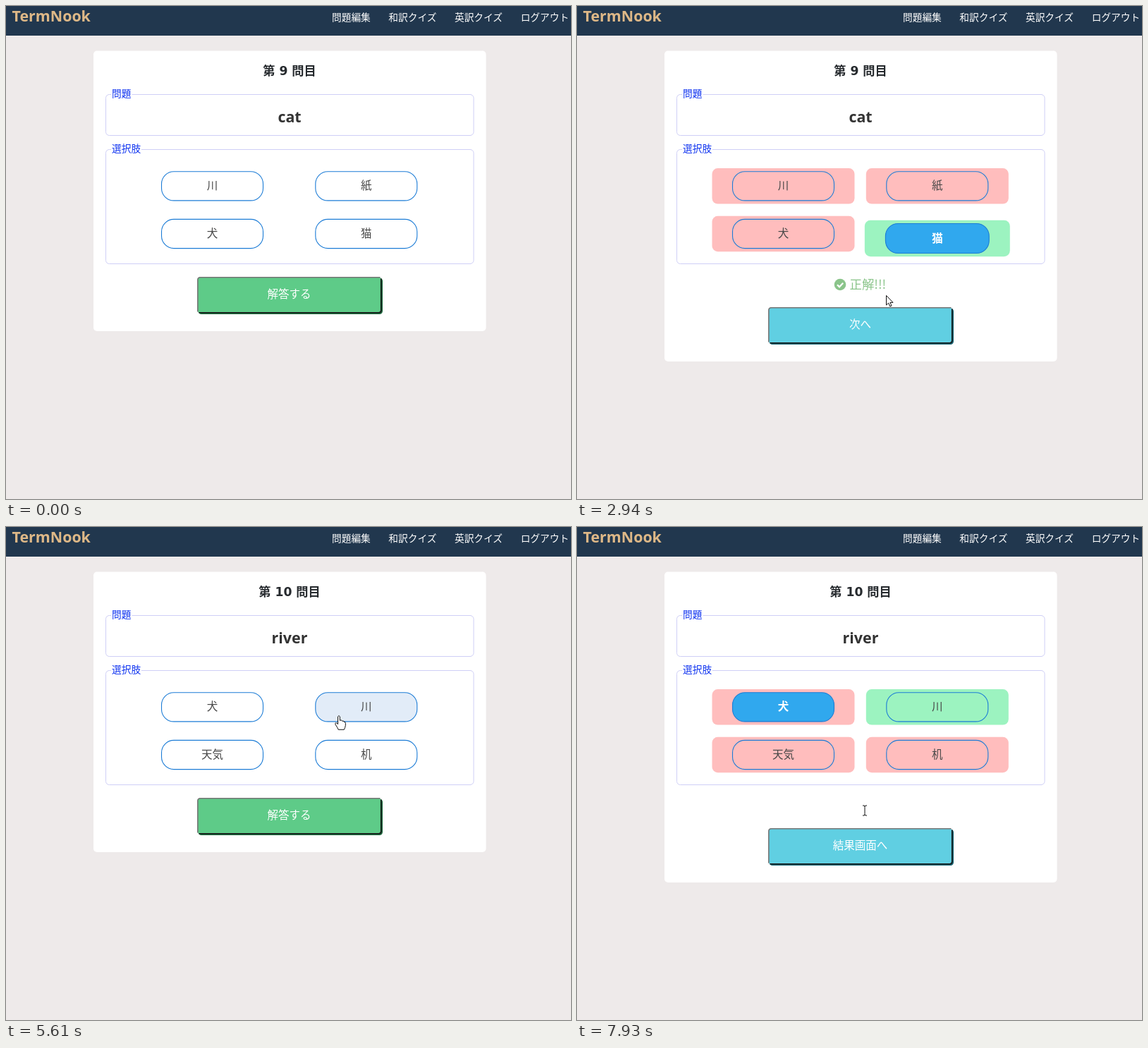
Recreate the animation shown at these times as an HTML page. Size 801 px wide and 699 px high, loop 8000 ms.

```html
<!DOCTYPE html>
<html lang="ja">
<head>
<meta charset="utf-8">
<title>Quiz</title>
<style>
  html, body { margin: 0; width: 100%; height: 100%; overflow: hidden; background: #eeeaea; }
  svg { display: block; }
  text { font-family: 'Noto Sans CJK JP', 'Noto Sans CJK', sans-serif; }
  .mid { text-anchor: middle; }
  .brand, .word { font: bold 21.4px 'Noto Sans', sans-serif; }
  .brand { fill: #deb887; }
  .word { fill: #333; }
  .nav { font-size: 13.7px; fill: #fff; }
  .title { font: bold 17.2px 'DejaVu Sans', 'Noto Sans CJK JP', 'Noto Sans CJK', sans-serif; fill: #262a2e; }
  .legend { font-size: 13.7px; fill: #1034f0; }
  .frame { fill: none; stroke: #cfcff6; }
  .label { font-size: 15.5px; }
  .pill { stroke: #1c7cd6; stroke-width: 1.1; }
  .edge { fill: none; stroke-width: 1.6; }
</style>
</head>
<body>
<svg width="801" height="699" viewBox="0 0 801 699">
  <rect width="801" height="42" fill="#21374e"/>
  <text class="brand" x="8.5" y="22">TermNook</text>
  <text class="nav" x="462" y="20.5">問題編集<tspan dx="25.6">和訳クイズ</tspan><tspan dx="25.6">英訳クイズ</tspan><tspan dx="25.6">ログアウト</tspan></text>
  <rect id="card" x="124" y="63.5" width="556.5" height="397.5" rx="5" fill="#fff"/>
  <text id="title" class="title mid" x="402" y="98"></text>

  <rect class="frame" x="141.5" y="125.5" width="521.5" height="58" rx="5"/>
  <rect class="frame" x="141.5" y="203.5" width="521.5" height="162" rx="5"/>
  <rect x="149" y="120" width="29.5" height="10" fill="#fff"/>
  <rect x="149" y="198" width="43" height="10" fill="#fff"/>
  <text class="legend" x="150" y="129">問題</text>
  <text class="legend" x="150" y="207">選択肢</text>

  <g id="quiz">
    <text id="word" class="word mid" x="402" y="165"></text>
    <g id="choices"></g>
  </g>

  <g id="button">
    <rect id="shade" x="-129" y="-24" width="261.5" height="51.5" rx="4.5"/>
    <rect id="face" x="-130" y="-25" width="260" height="50.5" rx="4"/>
    <path class="edge" d="M130.2-23V22Q130.2 25.2 127 25.2H-128" stroke="#141414"/>
    <path class="edge" d="M-129.7 24V-21Q-129.7-24.7-126-24.7H129" stroke="#767676"/>
    <text id="action" class="label mid" y="4.8" fill="#fff"></text>
  </g>

  <g id="message" fill="#008000">
    <circle cx="373" cy="395" r="8.3"/>
    <path d="M369 395.3l3 3 5.2-5.6" fill="none" stroke="#fff" stroke-width="2.2"/>
    <text x="386.5" y="401" font-size="17.4">正解!!!</text>
  </g>

  <g id="cursor" fill="#fff" stroke="#111" stroke-linejoin="round">
    <path id="arrow" d="M.5.5V14L3.7 11.2 5.8 16 8 15 5.9 10.4H10Z"/>
    <path id="hand" d="M-1.4 1.5Q0-1 1.4 1.5V7Q4 5.5 4.8 8 7 6.8 7.2 9 9.4 8.4 9.4 11V14Q9 17 7.4 20H-.8Q-1.6 17.5-5 12.6-5.4 9.2-2.6 11L-1.4 12.3Z"/>
    <path id="beam" d="M-3-7H-1L0-6 1-7H3M0-6V6M-3 7H-1L0 6 1 7H3" fill="none"/>
  </g>
</svg>
<script>
const LOOP = 8000;
const HOVER = 100;
const SVG = 'http://www.w3.org/2000/svg';
const $ = id => document.getElementById(id);
const set = (el, attrs) => { for (const k in attrs) el.setAttribute(k, attrs[k]); };
const show = (el, on) => set(el, { visibility: on ? 'visible' : 'hidden' });

// start, answered, picked: times; pick, key: choice indexes
const rounds = [
  { start: 0, answered: 2670, picked: 1770, pick: 3, key: 3, title: '第 9 問目', word: 'cat',
    choices: ['川', '紙', '犬', '猫'], next: '次へ' },
  { start: 4390, answered: 7925, picked: 7220, pick: 0, key: 1, title: '第 10 問目', word: 'river',
    choices: ['犬', '川', '天気', '机'], next: '結果画面へ' }
];

const place = {
  corner: [745, 688], topLeft: [316, 263], topRight: [479.5, 267.5], lowRight: [484.5, 318.5],
  submit: [438, 410], next: [438, 447], gap: [431, 374], message: [408, 402]
};

// Pointer moves: start, end, destination
const moves = [
  [0, 130, 'corner'], [130, 890, 'topLeft'], [960, 1240, 'topRight'], [1310, 1730, 'lowRight'],
  [1800, 2540, 'submit'], [3440, 3650, 'next'], [4500, 4660, 'gap'], [4800, 5280, 'topLeft'],
  [5350, 5650, 'topRight'], [5720, 5940, 'topLeft'], [6090, 6420, 'lowRight'],
  [6770, 7200, 'topLeft'], [7450, 7800, 'message']
];

const slots = [0, 1, 2, 3].map(i => {
  const add = (tag, attrs, parent) => {
    const el = document.createElementNS(SVG, tag);
    set(el, attrs);
    return parent.appendChild(el);
  };
  const g = add('g', {}, $('choices'));
  return {
    x: 292.5 + 218.3 * (i % 2),
    y: 255.3 + 67.7 * (i >> 1),
    g,
    mark: add('rect', { x: -101, y: -25.2, width: 202, height: 50.4, rx: 8 }, g),
    pill: add('rect', { x: -72, y: -20.6, width: 144, height: 41.2, rx: 17.5, class: 'pill' }, g),
    text: add('text', { y: 5, class: 'label mid' }, g)
  };
});

const clamp = p => Math.min(1, Math.max(0, p));
const smooth = p => p * p * (3 - 2 * p);

// The standard CSS "ease" curve, solved by bisection
function ease(p) {
  if (p <= 0 || p >= 1) return clamp(p);
  let lo = 0, hi = 1, u;
  for (let i = 0; i < 20; i++) {
    u = (lo + hi) / 2;
    if (.75 * u * (1 - u) + u ** 3 < p) lo = u; else hi = u;
  }
  return .3 * u * (1 - u) ** 2 + 3 * u * u * (1 - u) + u ** 3;
}

function pointer(t) {
  if (t < moves[0][1]) return null;
  let [x, y] = place.corner;
  for (const [from, to, name] of moves) {
    if (t < from) break;
    const k = smooth(clamp((t - from) / (to - from)));
    x += (place[name][0] - x) * k;
    y += (place[name][1] - y) * k;
  }
  return { x, y };
}

const inside = (c, x, y, rx, ry) => c && Math.abs(c.x - x) < rx && Math.abs(c.y - y) < ry;

// Share of the last moments spent over the button, for a smooth hover
function buttonHover(t, since, y) {
  const samples = 10;
  let n = 0;
  for (let i = 0; i < samples; i++) {
    const s = t - i * HOVER / samples;
    const pressed = s > 4120 && s < rounds[1].start;
    if (s >= since && !pressed && inside(pointer(s), 401.5, y, 130, 25)) n++;
  }
  return n / samples;
}

function drawChoices(round, t, c) {
  const done = t >= round.answered;
  const after = clamp((t - round.answered) / 1000);
  slots.forEach((s, i) => {
    const chosen = i === round.pick && t >= round.picked;
    const right = i === round.key;
    const hover = !done && inside(c, s.x, s.y, 72, 21);
    const swing = chosen && right ? Math.sin(after * Math.PI * 2) * (1 - after) : 0;
    const scale = 1 + Math.max(0, swing) * .027;
    set(s.g, { transform: `translate(${s.x} ${s.y + swing * 9}) scale(${scale})` });
    set(s.mark, { fill: !done ? 'none' : right ? '#9cf3c0' : '#ffbdbd' });
    set(s.pill, { fill: chosen ? '#30a8ee' : hover ? '#e2ecf8' : 'none' });
    set(s.text, { fill: chosen ? '#fff' : '#484848', 'font-weight': chosen ? 700 : 400 });
    s.text.textContent = round.choices[i];
  });
}

function drawButton(round, t) {
  const done = t >= round.answered;
  const y = done ? 452.5 : 409.5;
  const h = buttonHover(t, done ? round.answered : round.start, y);
  const fade = round.start ? ease((t - round.start) / 750) : 1;
  set($('button'), { transform: `translate(401.5 ${y}) scale(${1 - .045 * h})`, opacity: fade * (1 - .22 * h) });
  set($('face'), { fill: done ? '#60cfe2' : '#5ecb88' });
  set($('shade'), { fill: done ? '#1c6675' : '#1f6b40' });
  set($('action'), { 'font-weight': done ? 500 : 400 });
  $('action').textContent = done ? round.next : '解答する';
}

function drawCursor(c, done) {
  const onText = done && inside(c, 402, 395, 58, 10);
  const onChoice = !done && slots.some(s => inside(c, s.x, s.y, 72, 21));
  show($('arrow'), c && !onChoice && !onText);
  show($('hand'), c && onChoice);
  show($('beam'), c && onText);
  if (c) set($('cursor'), { transform: `translate(${c.x} ${c.y})` });
}

function render(t) {
  const round = rounds[t < rounds[1].start ? 0 : 1];
  const done = t >= round.answered;
  const won = done && round.pick === round.key;
  const c = pointer(t);
  $('title').textContent = round.title;
  $('word').textContent = round.word;
  set($('card'), { height: done ? 440.5 : 397.5 });
  set($('quiz'), { opacity: round.start ? ease((t - round.start) / 1000) : 1 });
  set($('message'), { opacity: won ? ease((t - round.answered) / 1000) : 0 });
  drawChoices(round, t, c);
  drawButton(round, t);
  drawCursor(c, done);
}

const begin = performance.now();
function tick() {
  render((performance.now() - begin) % LOOP);
  requestAnimationFrame(tick);
}
tick();
</script>
</body>
</html>
```
